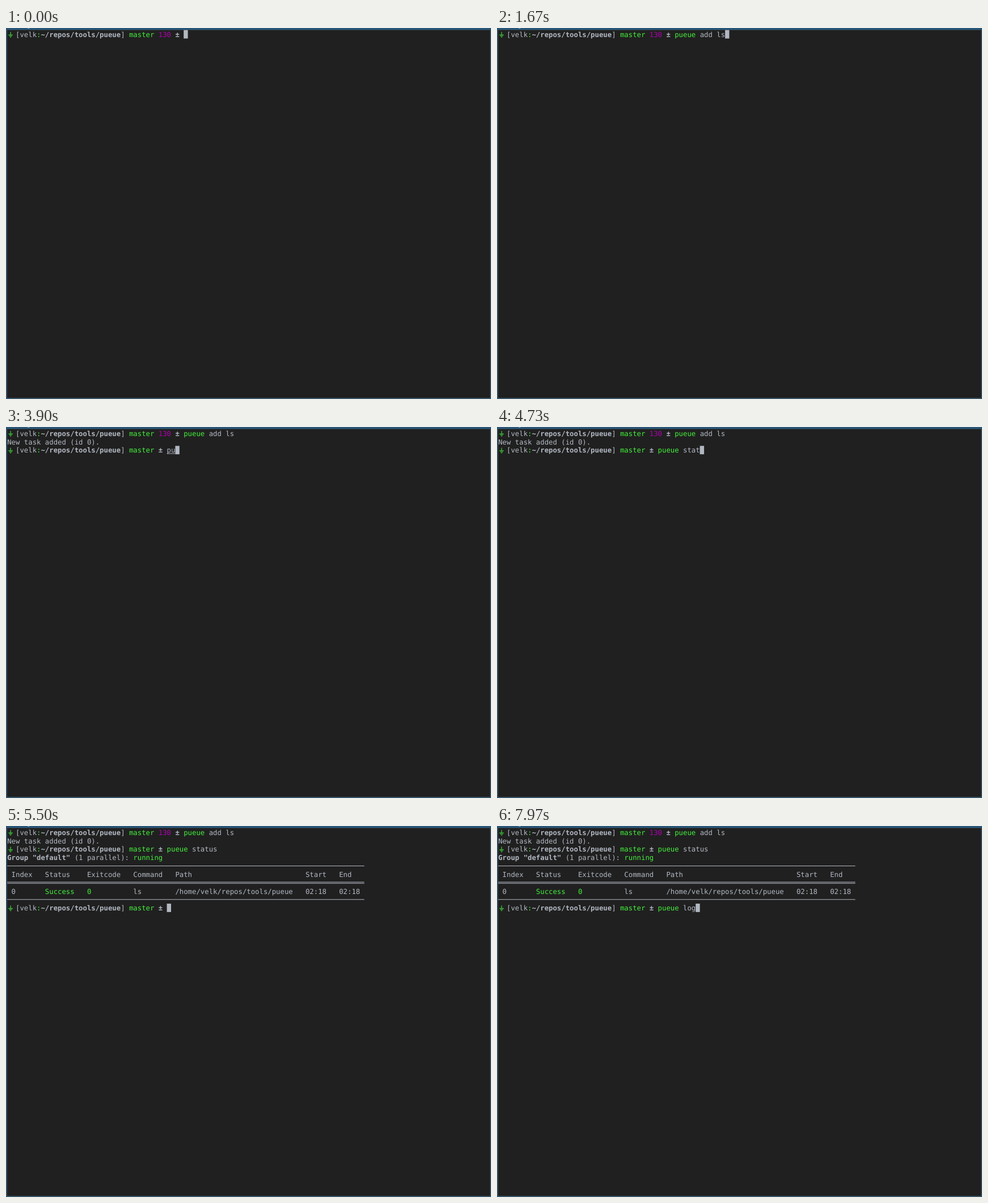
Recreate the animation shown at these times as an HTML page with a canvas. Size 855 by 655 pixels, loop 8000 ms.

```html
<!DOCTYPE html>
<html lang="en">
<head>
<meta charset="utf-8">
<title>Terminal session</title>
<style>
  html, body { margin: 0; width: 100%; height: 100%; overflow: hidden; background: #202020; }
  canvas { display: block; }
</style>
</head>
<body>
<canvas id="stage" width="855" height="655"></canvas>
<script>
const ctx = document.getElementById('stage').getContext('2d');

const LOOP = 8000;
const LEFT = 2.2, TOP = 3.7, CELL_W = 7.405, CELL_H = 14.82, BASE = 12.1;
const FONT = '12.3px "DejaVu Sans Mono", monospace';
const GRAY = '#b2b8c2', GREEN = '#44f03c', MAGENTA = '#b000b0';
const BACK = '#202020', BAR = '#285577', EDGE = '#375467';
const USER = 'velk', REPO = '/repos/tools/pueue';
const TABLE_COLS = 85;

const colX = col => LEFT + col * CELL_W;
const rowY = row => TOP + row * CELL_H;

function rect(x, y, w, h, color) {
  ctx.fillStyle = color;
  ctx.fillRect(x, y, w, h);
}

// Writes text on the character grid and returns the next free column.
function write(row, col, text, color = GRAY, bold = false) {
  ctx.font = (bold ? 'bold ' : '') + FONT;
  ctx.fillStyle = color;
  for (const ch of text) {
    if (ch !== ' ') ctx.fillText(ch, colX(col), rowY(row) + BASE);
    col++;
  }
  return col;
}

function earthSign(row) {
  const y = rowY(row);
  rect(7.6, y + 3.2, 1, 5.2, GREEN);
  rect(4.2, y + 8, 7.8, 1, GREEN);
  rect(5.7, y + 10, 4.8, 1, GREEN);
  rect(7.1, y + 12, 2, 1, GREEN);
}

function prompt(row, exitCode) {
  earthSign(row);
  let col = write(row, 2, '[' + USER);
  col = write(row, col, ':', GREEN);
  col = write(row, col, '~' + REPO, GRAY, true);
  col = write(row, col, '] ');
  col = write(row, col, 'master ', GREEN);
  if (exitCode) col = write(row, col, exitCode + ' ', MAGENTA);
  return write(row, col, '± ', GRAY, true);
}

// An unfinished command name is underlined; a known one turns green.
function command(row, col, text) {
  const name = text.split(' ')[0];
  const known = name === 'pueue';
  if (name && !known) {
    rect(colX(col), rowY(row) + 13.1, name.length * CELL_W, 1, GRAY);
  }
  const next = write(row, col, name, known ? GREEN : GRAY);
  return write(row, next, text.slice(name.length));
}

function cursor(row, col) {
  rect(colX(col), rowY(row), CELL_W, CELL_H, GRAY);
}

function rule(row, double) {
  const mid = rowY(row) + CELL_H / 2;
  const width = TABLE_COLS * CELL_W;
  for (const dy of double ? [-1.5, 0.7] : [-0.4]) {
    rect(LEFT, mid + dy, width, 1, GRAY);
  }
}

function statusTable(row) {
  let col = write(row, 0, 'Group "default"', GRAY, true);
  col = write(row, col, ' (1 parallel): ');
  write(row, col, 'running', GREEN);
  rule(row + 1);
  const cells = [
    [1, 'Index', '0'], [9, 'Status', 'Success', GREEN], [19, 'Exitcode', '0', GREEN],
    [30, 'Command', 'ls'], [40, 'Path', '/home/' + USER + REPO],
    [71, 'Start', '02:18'], [79, 'End', '02:18']
  ];
  for (const [x, head, value, color] of cells) {
    write(row + 2, x, head);
    write(row + 4, x, value, color);
  }
  rule(row + 3, true);
  rule(row + 5);
}

// Key bursts: start, end, number of typed characters after each step.
const lines = [
  { row: 0, code: '130', text: 'pueue add ls', enter: 2200, bursts: [
    [600, 1130, [1, 2, 3, 4, 5, 6, 7, 8]], [1270, 1330, [9, 10]], [1630, 1670, [11, 12]]] },
  { row: 2, show: 2330, text: 'pueue status', enter: 5300, bursts: [
    [3800, 4130, [1, 2, 3, 5, 6]], [4500, 4570, [7, 8]], [4730, 4900, [10, 11, 12]]] },
  { row: 9, show: 5500, text: 'pueue log', bursts: [
    [7200, 7730, [1, 2, 3, 5, 6, 7]], [7870, 7970, [8, 9]]] }
];

function typedCount(bursts, t) {
  let count = 0;
  for (const [start, end, counts] of bursts) {
    const gap = (end - start) / (counts.length - 1);
    counts.forEach((n, i) => { if (t >= start + i * gap - 0.5) count = n; });
  }
  return count;
}

function windowFrame() {
  rect(0, 0, 855, 655, BACK);
  rect(0, 0, 2, 655, EDGE);
  rect(853.5, 0, 1.5, 655, EDGE);
  rect(0, 653, 855, 2, EDGE);
  rect(0, 0, 855, 3, BAR);
  rect(0, 3, 855, 0.7, EDGE);
  rect(38, 0, 3.5, 0.8, '#a9bccb');
}

function draw(t) {
  windowFrame();
  if (t >= 2330) write(1, 0, 'New task added (id 0).');
  if (t >= 5400) statusTable(3);
  let at = [0, 0];
  for (const { row, code, show = 0, text, enter = LOOP, bursts } of lines) {
    if (t < show) break;
    const col = command(row, prompt(row, code), text.slice(0, typedCount(bursts, t)));
    at = t < enter ? [row, col] : [row + 1, 0];
  }
  if (t >= 5400 && t < 5500) at = [9, 0];
  cursor(...at);
}

ctx.textBaseline = 'alphabetic';
ctx.textRendering = 'geometricPrecision';
const began = performance.now();

function tick() {
  draw((performance.now() - began) % LOOP);
  requestAnimationFrame(tick);
}
tick();
</script>
</body>
</html>
```
